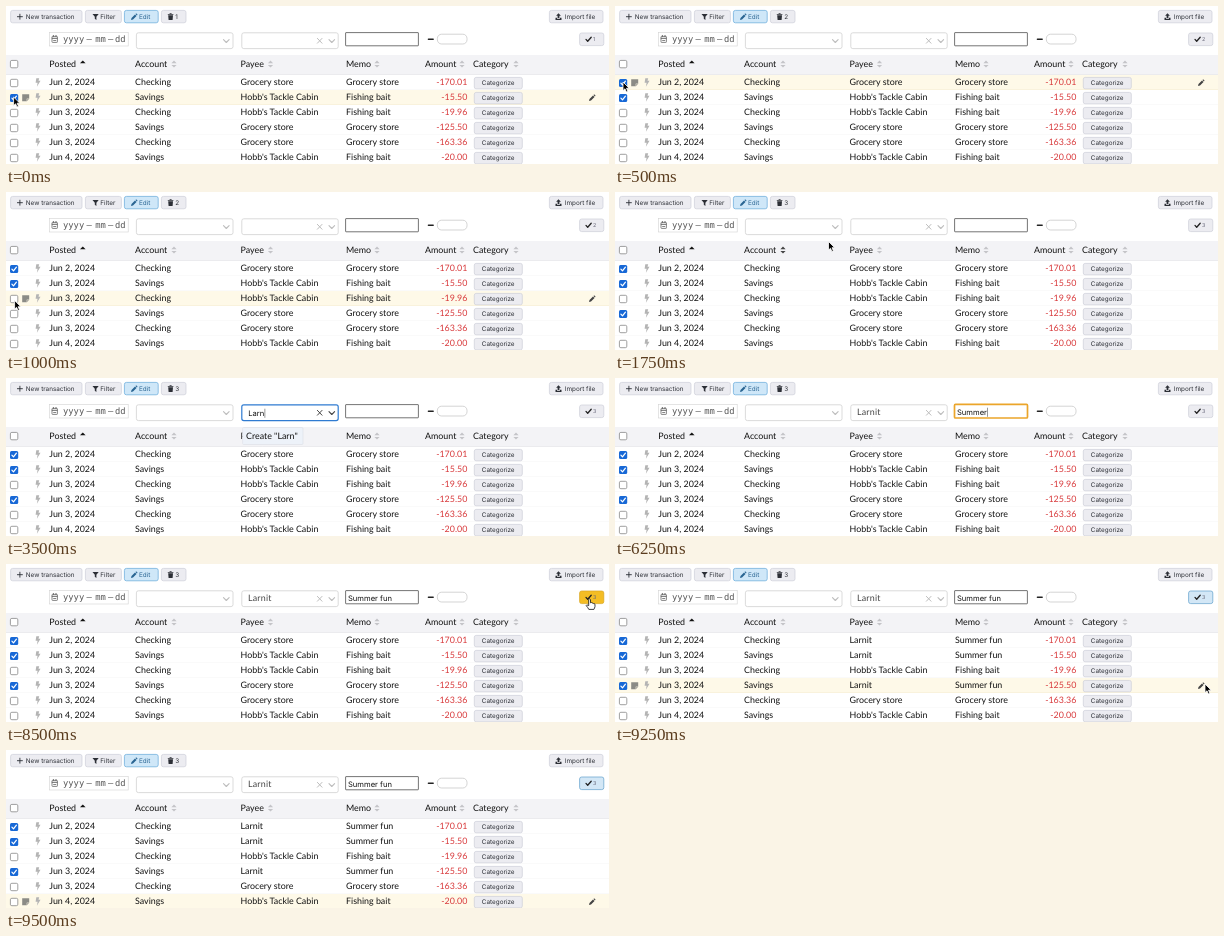
Write an HTML page that moves like this. It is 603 px wide and 158 px high and loops after 9.75 s.

```html
<!DOCTYPE html>
<html lang="en">
<head>
<meta charset="utf-8">
<title>Bulk edit transactions</title>
<style>
  html, body { margin: 0; width: 100%; height: 100%; overflow: hidden; background: #fff; }
  svg { display: block; width: 100vw; height: 100vh; }
  text { font: 8.9px Lato, sans-serif; fill: #111; text-rendering: geometricPrecision; }
  .ui { font: 6.35px Inter, sans-serif; fill: #2c2f36; }
  .active { fill: #2a6592; }
  .field { font: 7.6px Inter, sans-serif; }
  .date { font: 8.8px "DejaVu Sans Mono", monospace; fill: #555; }
  .value { letter-spacing: .2px; fill: #444; }
  .amount { fill: #d8393b; text-anchor: end; }
  .mid { text-anchor: middle; }
  .line { fill: none; stroke-linecap: round; stroke-linejoin: round; }
</style>
</head>
<body>
<svg id="stage" viewBox="0 0 603 158"></svg>
<script>
const STEP = 250, STEPS = 39;
const PAYEE = "Larnit", MEMO = "Summer fun";
const SHOP = ["Grocery store", "Grocery store"];
const BAIT = ["Hobb's Tackle Cabin", "Fishing bait"];
const ROWS = [
  ["Jun 2, 2024", "Checking", SHOP, "-170.01"],
  ["Jun 3, 2024", "Savings", BAIT, "-15.50"],
  ["Jun 3, 2024", "Checking", BAIT, "-19.96"],
  ["Jun 3, 2024", "Savings", SHOP, "-125.50"],
  ["Jun 3, 2024", "Checking", SHOP, "-163.36"],
  ["Jun 4, 2024", "Savings", BAIT, "-20.00"]
];
// Step at which each row becomes checked
const CHECKED_AT = { 0: 2, 1: 0, 3: 5 };
const PAYEE_FOCUS = 10, PAYEE_SET = 17, MEMO_FOCUS = 19, HOVER_APPLY = 33,
      CLICK_APPLY = 34, APPLIED = 35, LEAVE_APPLY = 37;
const POINTER = {
  0: [7.6, 91], 1: [8, 82], 2: [8, 76], 3: [8, 92], 4: [8.6, 108.5], 5: [8, 122],
  6: [100, 88], 7: [213.5, 49.5], 8: [262, 40], 9: [280, 36], 10: [284, 36],
  28: [380, 60], 29: [430, 52], 30: [490, 46], 31: [540, 41], 32: [572, 38],
  33: [583.6, 34.6], 34: [583.6, 34.6], 35: [583.6, 34.6], 36: [583.6, 34.6],
  37: [590, 120], 38: [588, 158.5]
};
const BUTTON = "#ececf1", BUTTON_EDGE = "#cdcfd8", ICON = "#2c2f36";

const text = (x, y, s, cls = "") => `<text x="${x}" y="${y}" class="${cls}">${s}</text>`;
const box = (x, y, w, h, fill, stroke = "none", r = 0, sw = .7) =>
  `<rect x="${x}" y="${y}" width="${w}" height="${h}" rx="${r}" fill="${fill}" stroke="${stroke}" stroke-width="${sw}"/>`;
const line = (d, stroke, sw = .8) => `<path class="line" d="${d}" stroke="${stroke}" stroke-width="${sw}"/>`;
const shape = (d, fill) => `<path d="${d}" fill="${fill}"/>`;
const at = (x, y, s) => `<g transform="translate(${x} ${y})">${s}</g>`;
const clamp = (v, lo, hi) => Math.max(lo, Math.min(hi, v));

const button = (x, w, label, textX, icon, active) =>
  box(x, 4.4, w, 12.4, active ? "#cfe7f8" : BUTTON, active ? "#62a8da" : BUTTON_EDGE, 2) +
  icon + text(textX, 13, label, active ? "ui active" : "ui");

const pencil = color => shape("M0 6.4 .5 4.4 4 .9 5.5 2.4 2 5.9ZM4.5.4 5 0Q5.4-.2 5.8.2L6.3.7Q6.6 1.1 6.3 1.5L5.9 1.9Z", color);
const chevron = (x, color) => line(`M${x - 2.8} 33.7l2.8 2.8 2.8-2.8`, color, 1.1);

function checkbox(y, on) {
  return on
    ? box(4, y, 8.2, 8.2, "#1768d6", "none", 1.5) + line(`M5.9 ${y + 4.3}l1.6 1.7 2.9-3.7`, "#fff", 1.2)
    : box(4.4, y + .4, 7.4, 7.4, "#fff", "#777", 1.4, .7);
}

function sortIcon(x, color) {
  return shape(`M${x - 2.6} 57.3h5.2l-2.6-2.7zM${x - 2.6} 58.9h5.2l-2.6 2.7z`, color);
}

function toolbar(count) {
  const funnel = shape("M86.5 8h6.2l-2.3 2.7v3.2l-1.6-1.2v-2z", ICON);
  const trash = shape("M161.8 8h1.6l.4-.7h1.6l.4.7h1.6v.8h-5.6zM162.2 9.3h4.8l-.4 4.8h-4z", ICON);
  const upload = shape("M552.5 7.3l2.4 2.5h-1.5v2.2h-1.8V9.8h-1.5zM549.5 11.7h1.5v1h3v-1h1.5v2.3h-6z", ICON);
  return button(4.6, 71.4, "New transaction", 19.8, line("M11.4 10.7h5M13.9 8.2v5", ICON, .9)) +
    button(79.4, 36, "Filter", 94.3, funnel) +
    button(118.4, 33.8, "Edit", 133, at(125, 7.6, pencil("#2a6592")), true) +
    button(155.4, 24.6, count, 169.2, trash) +
    button(543.4, 53.6, "Import file", 558.8, upload);
}

function dateField() {
  const parts = [["yyyy", 57], ["–", 80.6], ["mm", 89.3], ["–", 102], ["dd", 109]];
  return box(43.4, 26.6, 78.8, 13.4, "#fff", "#d2d2d2", 0, .6) +
    box(46, 30.4, 5.4, 6, "none", "#666", .6, .8) +
    line("M46.2 32.3h5M47.4 29.5v1M50 29.5v1", "#666", 1) +
    line("M47.6 34.5h2.2", "#666", .8) +
    parts.map(([s, x]) => text(x, 36.2, s, "date")).join("");
}

function filters(step, count) {
  const payeeFocus = step >= PAYEE_FOCUS && step < MEMO_FOCUS;
  const memoFocus = step >= MEMO_FOCUS && step < CLICK_APPLY;
  const typing = step >= PAYEE_FOCUS && step < PAYEE_SET;
  const caret = '<tspan dx="-.6" font-weight="300">|</tspan>';
  const typed = PAYEE.slice(0, clamp(step - PAYEE_FOCUS, 0, PAYEE.length));
  const memo = MEMO.slice(0, clamp(2 * (step - 22), 0, MEMO.length));
  const dark = payeeFocus ? "#444" : "#bdbdbd";

  let s = dateField() + box(130.4, 26.8, 96.6, 15.8, "#fff", "#cccccc", 2) + chevron(220.3, "#bdbdbd");

  s += box(235.8, 26.8, 96.4, 15.8, "#fff", payeeFocus ? "#2f7bd1" : "#cccccc", 2, payeeFocus ? 1.2 : .7) +
    line("M311.4 32.4l4.6 4.8M316 32.4l-4.6 4.8", dark, 1) + chevron(325.8, dark);
  if (typing) s += text(242.3, 37.6, typed + caret, "field");
  else if (step >= PAYEE_SET) s += text(242, 37.4, PAYEE, "value");

  s += memoFocus
    ? box(339.5, 26.4, 73, 13.6, "#fff", "#eba52a", 1, 1.7)
    : box(339.6, 26.6, 72.8, 13.2, "#fff", "#666", .4, .9);
  s += text(342, 36.5, memo + (memoFocus ? caret : ""), "field");

  s += line("M422.4 33.2h4.8", "#222", 1.4) + box(431.4, 28.2, 29.6, 9.8, "#fff", "#c2c2c2", 4.2);

  const hot = step >= HOVER_APPLY && step < LEAVE_APPLY;
  const [fill, edge] = hot ? ["#f4bd24", "#d8a520"]
    : step >= LEAVE_APPLY ? ["#d3e7f6", "#5f9fcc"] : [BUTTON, BUTTON_EDGE];
  s += box(573.6, 27, 24.2, 12.6, fill, edge, 2) +
    line("M580 33.4l1.7 1.8 3.5-4", "#222", 1.3) +
    `<text x="587" y="35.2" class="ui" style="font-size:5.4px;fill:#667">${count}</text>`;
  return s;
}

function header(step) {
  const columns = [["Account", 129, 168], ["Payee", 234.5, 264.5], ["Memo", 340, 371], ["Amount", 419, 456], ["Category", 467, 510]];
  let s = box(0, 49, 603, 19.5, "#f3f3f6") + line("M0 68.7H603", "#dcdce0", .6) +
    checkbox(54, false) + text(43.3, 61.2, "Posted") + shape("M74 57.3h5.6l-2.8-2.8z", "#111");
  columns.forEach(([name, x, icon], i) => {
    s += text(x, 61.2, name) + sortIcon(icon, i === 0 && step === 7 ? "#444" : "#c4c4c8");
  });
  return s;
}

function row(i, step, hovered) {
  const [date, account, details, amount] = ROWS[i];
  const checked = step >= (CHECKED_AT[i] ?? Infinity);
  const [payee, memo] = checked && step >= APPLIED ? [PAYEE, MEMO] : details;
  const hover = hovered === i;
  let s = box(0, 0, 603, 15, hover ? "#fef9e8" : "#fff") +
    line("M0 15H603", hover ? "#ede2c0" : "#efefef", .6);
  if (hover) {
    s += shape("M16.2 4.2h7v4.6l-2.3 2.4h-4.7z", "#8b8b86") + line("M23.2 8.8h-2.3v2.4", "#fef9e8", .5) +
      at(583, 4.5, pencil("#444"));
  }
  s += checkbox(3.9, checked) + shape("M30.3 3.2h2.9l-.7 2.5h2l-3.6 6 .7-4h-2z", "#b4b4b4") +
    text(43.3, 10.2, date) + text(129, 10.2, account) +
    text(234.5, 10.2, payee) + text(340, 10.2, memo) + text(461.3, 10.2, amount, "amount") +
    box(468.3, 2.4, 48, 11.4, BUTTON, BUTTON_EDGE, 1.8) + text(492.2, 10.3, "Categorize", "ui mid");
  return at(0, 69 + 15 * i, s);
}

function menu(step) {
  if (step <= PAYEE_FOCUS || step >= PAYEE_SET) return "";
  const typed = PAYEE.slice(0, step - PAYEE_FOCUS);
  return box(236.6, 49.5, 60.4, 17, "#edf2f9", "#dcdfe6", 1, .6) + text(240, 60.8, `Create "${typed}"`);
}

function cursor(step) {
  if (!POINTER[step]) return "";
  const hand = step >= HOVER_APPLY && step < LEAVE_APPLY;
  const d = hand
    ? "M-.9 1Q0-.4.9 1V4.2Q2 3.5 2.5 4.5 3.6 4 4 5 5.4 4.6 5.4 6.2V8Q5 9.5 4.3 10.8H-.8Q-1.8 8.8-3.4 7-3.4 5.6-.9 7Z"
    : "M0 0V8.6L2 6.8 3.4 10 4.9 9.3 3.5 6.2H6.2Z";
  const paint = hand ? 'fill="#fff" stroke="#111"' : 'fill="#000" stroke="#fff"';
  return at(...POINTER[step], `<path d="${d}" ${paint} stroke-width=".8" stroke-linejoin="round"/>`);
}

function draw(step) {
  const count = Object.values(CHECKED_AT).filter(start => step >= start).length;
  const y = POINTER[step]?.[1] ?? 0;
  const hovered = Math.floor((y - 69) / 15);
  return toolbar(count) + filters(step, count) + header(step) +
    ROWS.map((_, i) => row(i, step, hovered)).join("") + menu(step) + cursor(step);
}

const stage = document.getElementById("stage");
const start = performance.now();
let shown = -1;
function tick() {
  const step = Math.floor((performance.now() - start) / STEP) % STEPS;
  if (step !== shown) stage.innerHTML = draw(shown = step);
  requestAnimationFrame(tick);
}
tick();
</script>
</body>
</html>
```
